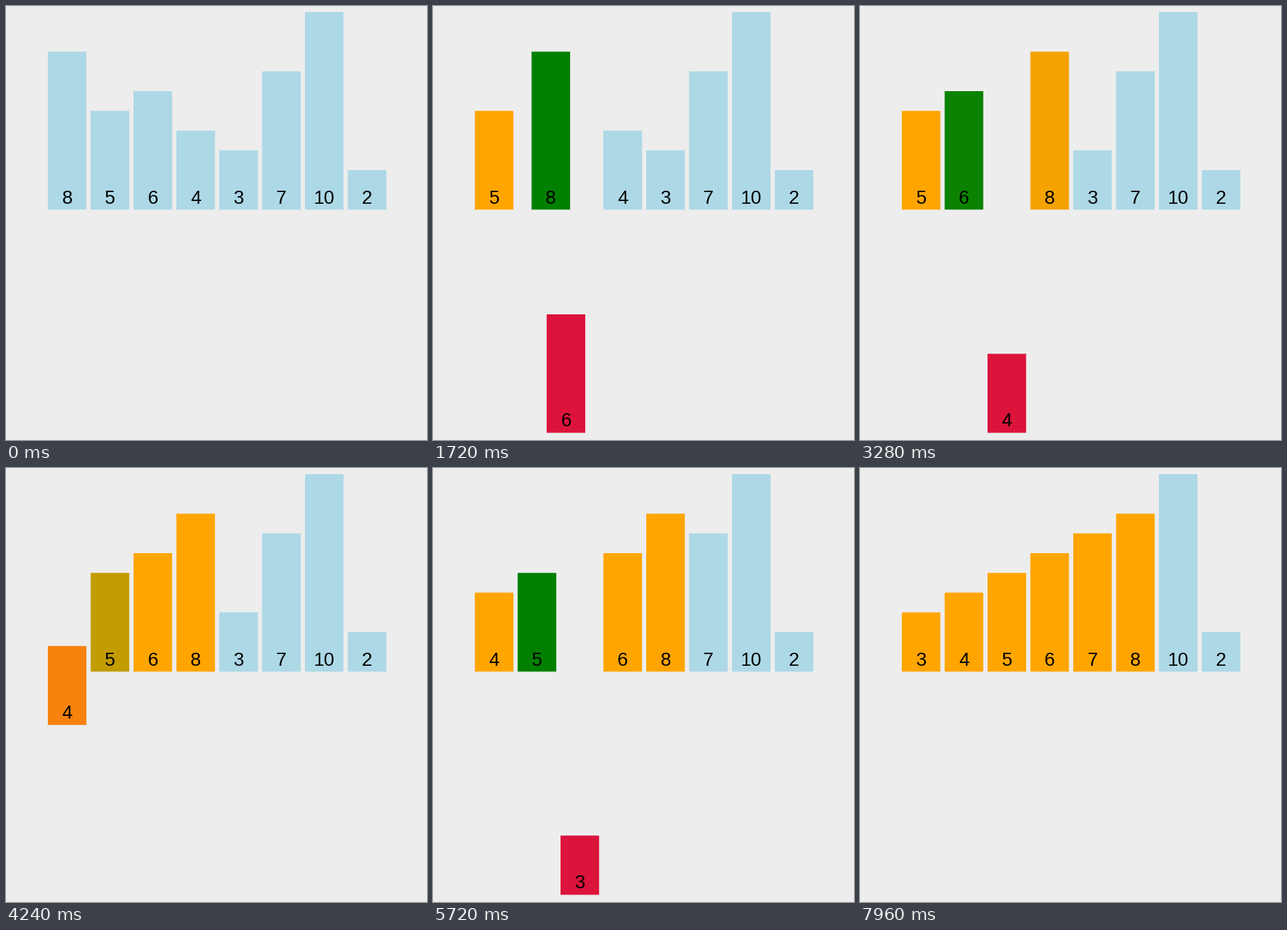
A matplotlib script that plays this animation: 614 by 632 pixels, repeating every 8000 ms.

```python
import numpy as np
import matplotlib.pyplot as plt
from matplotlib.animation import FuncAnimation
from matplotlib.colors import to_rgb
from matplotlib.patches import Rectangle

W, H, DPI = 614, 632, 64
STEP_MS, LOOP_MS = 40, 8000
LEFT, PITCH, BAR_W = 61, 62.5, 56.25
BASE, UNIT, DROP = 296.5, 28.75, 325
VALUES = [8, 5, 6, 4, 3, 7, 10, 2]

PLAIN, SORTED, TAKEN, COMPARED = (
    np.array(to_rgb(c)) for c in ("lightblue", "orange", "crimson", "green"))

# Playback clock: time in ms against position in the list of states
CLOCK_MS = [0, 1080, 2360, 4240, 5720, 6840, 7960, 8200]
CLOCK_POS = [1.0, 5.76, 11.105, 18.609, 24.92, 29.524, 34.0, 35.0]


def sort_states():
    """Insertion sort as a list of {value: (slot, depth, colour)} states."""
    order = list(VALUES)
    depth = {v: 0 for v in order}
    colour = {v: PLAIN for v in order}
    states = []

    def push():
        states.append({v: (i, depth[v], colour[v]) for i, v in enumerate(order)})

    push()
    colour[order[0]] = SORTED
    push()
    for i in range(1, len(order)):
        key = order[i]
        depth[key], colour[key] = 1, TAKEN
        push()
        for j in range(i - 1, -1, -1):
            other = order[j]
            colour[other] = COMPARED
            push()
            swap = other > key
            if swap:
                order[j], order[j + 1] = key, other
                push()
            colour[other] = SORTED
            if not swap:
                break
        depth[key], colour[key] = 0, SORTED
        push()
    return states


def ease(t):
    return 4 * t ** 3 if t < 0.5 else 1 - 4 * (1 - t) ** 3


STATES = sort_states()

fig = plt.figure(figsize=(W / DPI, H / DPI), dpi=DPI, facecolor="#ededed")
ax = fig.add_axes([0, 0, 1, 1])
ax.set_xlim(0, W)
ax.set_ylim(H, 0)
ax.axis("off")

bars, labels = {}, {}
for v in VALUES:
    bars[v] = ax.add_patch(
        Rectangle((0, 0), BAR_W, v * UNIT, linewidth=0, snap=False))
    labels[v] = ax.text(0, 0, str(v), family="Liberation Sans",
                        fontsize=27.5 * 72 / DPI, color="black",
                        ha="center", va="baseline", zorder=3)


def draw(frame):
    pos = np.interp(frame * STEP_MS, CLOCK_MS, CLOCK_POS)
    k = int(pos)
    e = ease(pos - k)
    for v in VALUES:
        slot, depth, colour = (
            a + (b - a) * e for a, b in zip(STATES[k - 1][v], STATES[k][v]))
        x = LEFT + PITCH * slot
        bottom = BASE + DROP * depth
        bars[v].set_xy((x, bottom - v * UNIT))
        bars[v].set_facecolor(np.clip(colour, 0, 1))
        labels[v].set_position((x + BAR_W / 2, bottom - 9))
    return [*bars.values(), *labels.values()]


anim = FuncAnimation(fig, draw, frames=LOOP_MS // STEP_MS, interval=STEP_MS,
                     repeat=True, repeat_delay=0, blit=False)
plt.show()
```
